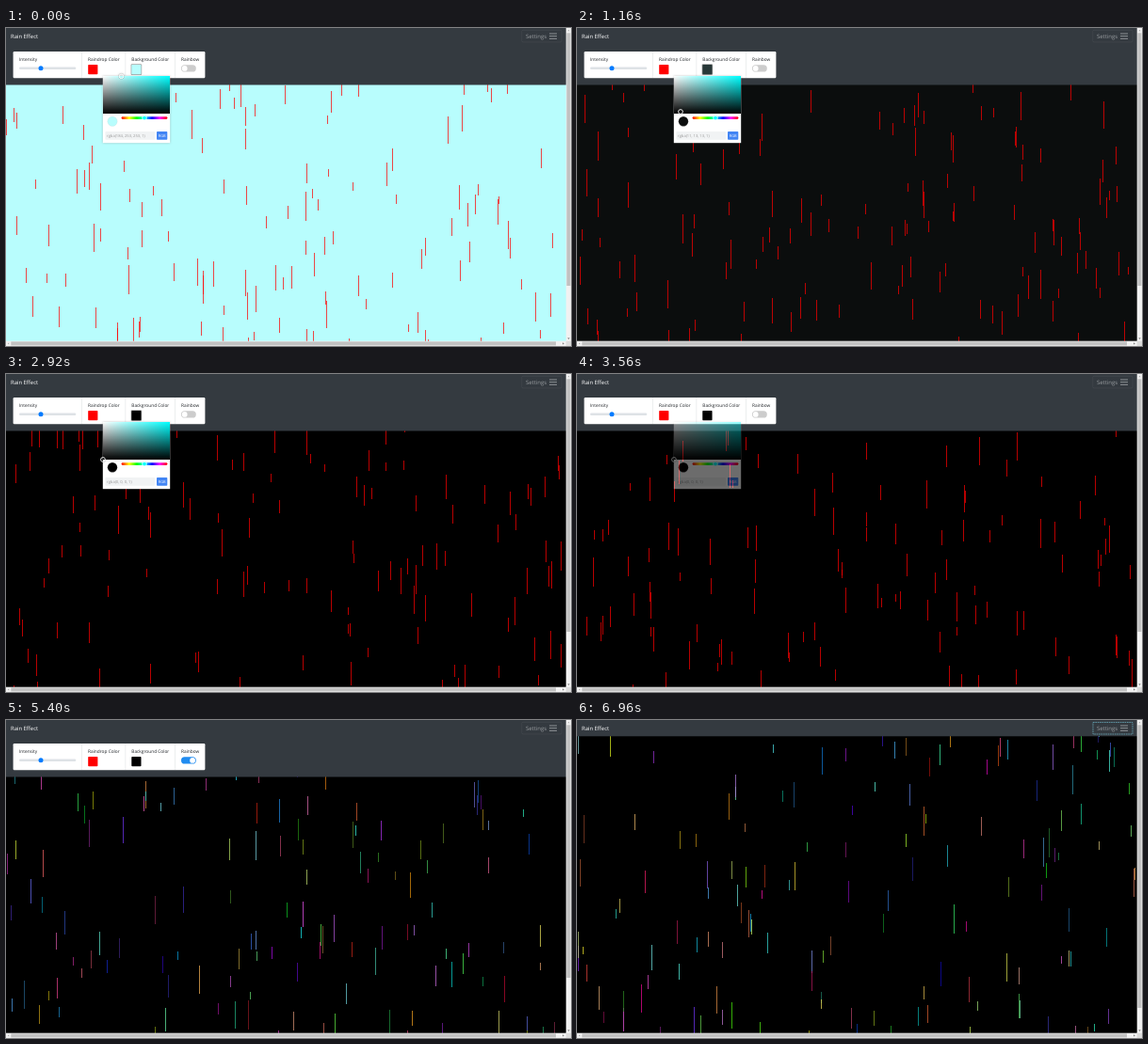
Recreate the animation shown at these times as an HTML page with a canvas. Size 600 by 338 pixels, loop 7000 ms.

```html
<!DOCTYPE html>
<html lang="en">
<head>
<meta charset="utf-8">
<title>Rain Effect</title>
<style>
html, body { margin: 0; width: 600px; height: 338px; overflow: hidden; background: #000; }
canvas, svg { position: absolute; left: 0; top: 0; display: block; }
text { font-family: "Open Sans", "Noto Sans", sans-serif; text-rendering: geometricPrecision; }
.label { font-size: 4.8px; fill: #212529; }
#picker { filter: drop-shadow(0 .5px 1px rgba(0, 0, 0, .25)); }
</style>
</head>
<body>
<canvas id="rain" width="600" height="338"></canvas>
<svg width="600" height="338" viewBox="0 0 600 338">
  <defs>
    <linearGradient id="sat"><stop stop-color="#fff"/><stop offset="1" stop-color="#0ff"/></linearGradient>
    <linearGradient id="dark" x2="0" y2="1"><stop stop-opacity="0"/><stop offset="1"/></linearGradient>
    <linearGradient id="hue">
      <stop stop-color="#f00"/><stop offset=".167" stop-color="#ff0"/><stop offset=".333" stop-color="#0f0"/>
      <stop offset=".5" stop-color="#0ff"/><stop offset=".667" stop-color="#00f"/>
      <stop offset=".833" stop-color="#f0f"/><stop offset="1" stop-color="#f00"/>
    </linearGradient>
    <clipPath id="navClip"><rect id="clipBox" width="595" height="60.5"/></clipPath>
  </defs>

  <rect id="nav" width="595" height="60.5" fill="#343a40"/>
  <text x="5" y="11" font-size="5.9" fill="#fff">Rain Effect</text>
  <rect x="547.8" y="2.3" width="42.2" height="12.6" rx="1.2" fill="none" stroke="#fff" stroke-opacity=".1" stroke-width=".5"/>
  <rect id="focus" x="548" y="2.5" width="42" height="12.5" fill="none" stroke="#62a5b5" stroke-width=".8" stroke-dasharray="1.6 .8"/>
  <text x="552" y="10.6" font-size="5.95" fill="#999da0">Settings</text>
  <path d="M577 6h8M577 8.7h8M577 11.4h8" stroke="#a4a7aa" stroke-width=".8"/>

  <g clip-path="url(#navClip)">
    <rect x="7.6" y="25" width="203.8" height="28.2" rx="1.2" fill="#fff"/>
    <path d="M80.5 25v28M126.8 25v28M179.5 25v28" stroke="#dfe2e5" stroke-width=".6"/>
    <text class="label" x="14" y="34.8">Intensity</text>
    <text class="label" x="87" y="34.8">Raindrop Color</text>
    <text class="label" x="133.3" y="34.8">Background Color</text>
    <text class="label" x="186" y="34.8">Rainbow</text>
    <rect x="14" y="41.4" width="60.3" height="2.5" rx="1.25" fill="#dee2e6"/>
    <circle cx="37" cy="42.7" r="2.5" fill="#007bff"/>
    <rect x="87.2" y="39" width="10.2" height="10.2" rx=".8" fill="#f00"/>
    <rect id="ring" x="132.6" y="38.3" width="11.6" height="11.6" rx="1.2" fill="#555" fill-opacity=".55"/>
    <rect id="swatch" x="133.3" y="39" width="10.2" height="10.2" rx=".8"/>
    <rect id="pill" x="186" y="39.2" width="15.8" height="7.4" rx="3.7"/>
    <circle id="knob" cx="189.7" cy="42.9" r="2.9" fill="#fff"/>
  </g>

  <g id="picker">
    <rect x="102.8" y="51" width="71.4" height="71.2" fill="#fff"/>
    <rect x="103" y="51" width="71" height="40" fill="url(#sat)"/>
    <rect x="103" y="51" width="71" height="40" fill="url(#dark)"/>
    <circle id="preview" cx="113" cy="99.2" r="5.2" stroke="#ccc" stroke-width=".2"/>
    <rect x="122.6" y="94.3" width="48.8" height="2.6" rx="1.3" fill="url(#hue)"/>
    <circle cx="147" cy="95.6" r="2.3" fill="#0ff" stroke="#fff" stroke-width=".8"/>
    <rect x="105.4" y="110" width="52.6" height="8.8" rx=".8" fill="#f1f3f4"/>
    <text id="value" x="107" y="115.9" font-size="4.1" fill="#999"></text>
    <rect x="160" y="110" width="11.3" height="8.8" rx=".8" fill="#4285f4"/>
    <text x="165.65" y="115.8" font-size="4" fill="#fff" text-anchor="middle">RGB</text>
    <g id="handle" fill="none">
      <circle r="2.9" stroke="#000" stroke-opacity=".35" stroke-width=".5"/>
      <circle r="2.4" stroke="#fff" stroke-width=".9"/>
    </g>
  </g>

  <rect x="594.7" width="5.3" height="338" fill="#f1f1f1"/>
  <rect y="332.7" width="600" height="5.3" fill="#f1f1f1"/>
  <rect x="594.7" y="332.7" width="5.3" height="5.3" fill="#dcdcdc"/>
  <rect id="thumb" x="595.4" y="5.3" width="4" fill="#c1c1c1"/>
  <rect x="5.3" y="333.4" width="578.7" height="4" fill="#c1c1c1"/>
  <path d="M596.3 3.2h2.4l-1.2-1.3z" fill="#a3a3a3"/>
  <path d="M596.3 329.4h2.4l-1.2 1.3zM591.3 334.2v2.4l1.3-1.2z" fill="#505050"/>
  <path d="M3.2 334.2v2.4l-1.3-1.2z" fill="#a3a3a3"/>
</svg>
<script>
const LOOP = 7000, STEP = 40, DROPS = 150, VIEW = 333;
const CLOSE = 3450, RAINBOW = 3940, CLICK = 6200, FOLD = 6290;
// time, x, y of the colour handle
const drag = [
  [0, 122.5, 51.3], [600, 122.5, 51.3], [760, 144.2, 65.6],
  [960, 130, 79], [1200, 106, 91], [2250, 106, 91], [2500, 103, 91]
];
const $ = id => document.getElementById(id);
const ctx = $('rain').getContext('2d');
const set = (id, attrs) => {
  for (const k in attrs) $(id).setAttribute(k, attrs[k]);
};
const mix = (a, b, p) => a + (b - a) * p;
const ramp = (t, start, length) => {
  const p = Math.min(1, Math.max(0, (t - start) / length));
  return p * p * (3 - 2 * p);
};
const rnd = (a, b, c) => {
  const n = Math.sin(a * 12.9898 + b * 78.233 + c * 37.719) * 43758.5453;
  return n - Math.floor(n);
};

function handleAt(t) {
  for (let i = 1; i < drag.length; i++) {
    const [t0, x0, y0] = drag[i - 1], [t1, x1, y1] = drag[i];
    if (t <= t1) {
      const p = Math.max(0, (t - t0) / (t1 - t0));
      return [mix(x0, x1, p), mix(y0, y1, p)];
    }
  }
  return drag[drag.length - 1].slice(1);
}

function colorAt(t) {
  const [x, y] = handleAt(t);
  const v = 255 * (1 - (y - 51) / 40);
  const r = Math.round(v * (1 - (x - 103) / 71)), g = Math.round(v);
  return `rgba(${r}, ${g}, ${g}, 1)`;
}

function drawRain(t, top) {
  ctx.globalAlpha = 1;
  ctx.fillStyle = colorAt(t);
  ctx.fillRect(0, 0, 600, 338);
  ctx.globalAlpha = .72;
  for (let i = 0; i < DROPS; i++) {
    const len = mix(8, 31, rnd(i, 1, 0));
    const speed = mix(.14, .34, rnd(i, 2, 0));
    const span = VIEW + len;
    const dist = rnd(i, 3, 0) * span + t * speed;
    const lap = Math.floor(dist / span);
    const x = Math.floor(rnd(i, 4, lap) * 594);
    const y = top + dist - lap * span - len;
    ctx.fillStyle = t < RAINBOW ? '#f00'
      : `hsl(${rnd(i, 5, lap) * 360}, ${mix(45, 95, rnd(i, 6, lap))}%, ${mix(30, 70, rnd(i, 7, lap))}%)`;
    ctx.fillRect(x, Math.round(y), 1, Math.round(len));
  }
}

function draw(t) {
  const fold = ramp(t, FOLD, 350), navH = mix(60.5, 17.3, fold);
  const on = ramp(t, RAINBOW, 180);
  const [x, y] = handleAt(t), color = colorAt(t);
  drawRain(t, navH);
  set('nav', { height: navH });
  set('clipBox', { height: navH });
  set('thumb', { height: mix(274, 306, fold) - 5.3 });
  set('focus', { opacity: t < CLICK ? 0 : 1 });
  set('swatch', { fill: colorAt(Math.max(0, t - 135)) });
  set('ring', { opacity: 1 - ramp(t, CLOSE, 150) });
  set('pill', { fill: `rgb(${mix(204, 33, on)}, ${mix(204, 140, on)}, ${mix(204, 240, on)})` });
  set('knob', { cx: mix(189.7, 198.1, on) });
  set('picker', { opacity: 1 - ramp(t, CLOSE, 200) });
  set('preview', { fill: color });
  set('handle', { transform: `translate(${x} ${y})` });
  $('value').textContent = color;
}

const start = performance.now();
function tick() {
  const t = (performance.now() - start) % LOOP;
  draw(Math.floor(t / STEP) * STEP);
  requestAnimationFrame(tick);
}
tick();
</script>
</body>
</html>
```
